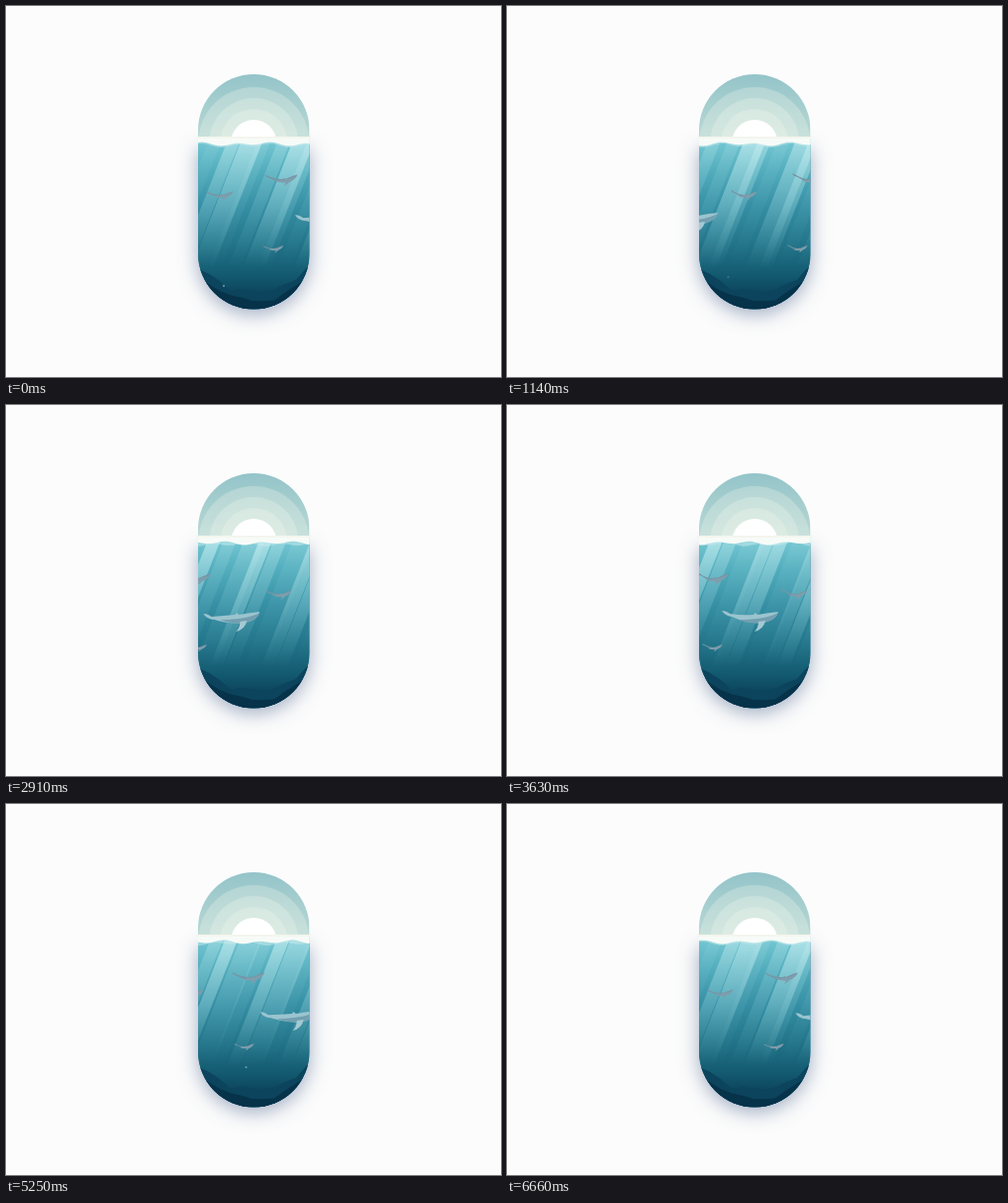
These frames come from a looping animation (500x375 px, 6.69 s). An HTML page with a canvas:

```html
<!DOCTYPE html>
<html lang="en">
<head>
<meta charset="utf-8">
<title>Whales</title>
<style>
  html, body { margin: 0; width: 100%; height: 100%; overflow: hidden; background: #fcfcfc; }
  canvas { display: block; }
</style>
</head>
<body>
<canvas id="stage" width="500" height="375"></canvas>
<script>
const c = document.getElementById('stage').getContext('2d');
const LOOP = 6690, STEP = 30, TAU = Math.PI * 2;
const LEFT = 194, RIGHT = 306.5, TOP = 69, BOTTOM = 306.5, SURFACE = 133;
const WIDTH = RIGHT - LEFT, RADIUS = WIDTH / 2, MID = LEFT + RADIUS;

// start x, y, distance swum per loop, size
const whales = [[270, 245, 137, .36], [216, 191, 136.5, .47], [278, 175, 155, .58], [321, 217, 164, 1]];

// Repeatable pseudo-random number in 0..1
const noise = n => Math.abs(Math.sin(n * 127.1 + 3) * 43758.5) % 1;

function gradient(y0, y1, ...colours) {
  const g = c.createLinearGradient(0, y0, 0, y1);
  colours.forEach((colour, i) => g.addColorStop(i / (colours.length - 1), colour));
  return g;
}

const sky = gradient(TOP, SURFACE, '#94c4c9', '#b8d8d4');
const water = gradient(SURFACE, BOTTOM, '#78cad5', '#51acbc', '#368fa4', '#24778c', '#135a70', '#06334b');
const beam = gradient(138, 265, '#d8f6f7', '#a5dfe6aa', '#7dc8d400');

function fill(path, colour) {
  c.fillStyle = colour;
  c.fill(path);
}

function disc(x, y, r, colour) {
  const path = new Path2D();
  path.arc(x, y, r, 0, TAU);
  fill(path, colour);
}

function capsule(top, corners) {
  const path = new Path2D();
  path.roundRect(LEFT, top, WIDTH, BOTTOM - top, corners);
  return path;
}

// Fills between a curve y(x) and a level edge
function area(edge, step, y, colour) {
  const path = new Path2D();
  path.moveTo(LEFT, edge);
  for (let x = LEFT; x < RIGHT + step; x += step) path.lineTo(x, y(x));
  path.lineTo(RIGHT + step, edge);
  fill(path, colour);
}

function drawShadow() {
  c.save();
  c.shadowColor = 'rgba(70, 95, 140, .5)';
  c.shadowBlur = 19;
  c.shadowOffsetY = 5;
  fill(capsule(140, [0, 0, RADIUS, RADIUS]), '#24778c');
  c.restore();
}

function drawSky() {
  c.fillStyle = sky;
  c.fillRect(LEFT, TOP, WIDTH, SURFACE - TOP);
  for (let r = 56; r > 23; r -= 11) disc(MID, 138, r, 'rgba(242, 247, 236, .27)');
  disc(MID, 138, 23, '#fff');
}

function drawRays(p) {
  for (let i = 0; i < 9; i++) {
    const turn = TAU * (p - .5 - .3 * i);
    const x = 204 + 17 * i + 2 * Math.sin(turn), w = i % 3 == 2 ? 22 : 13;
    c.globalAlpha = .32 + .24 * Math.cos(turn);
    fill(new Path2D(`M${x} 138h${w}l-50 127h${-w}z`), beam);
  }
  c.globalAlpha = 1;
}

function drawRocks() {
  [[293, 27, '#0b445c'], [301, 23, '#06324a']].forEach(([floor, lift, colour], layer) =>
    area(BOTTOM, 11, x => floor - lift * ((x - MID) / RADIUS) ** 2 - 6 * noise(Math.round(x) + layer), colour));
}

function drawSpecks(t) {
  for (let i = 0; i < 9; i++) {
    const age = (t - i * LOOP / 9) / 700;
    if (age < 0 || age >= 1) continue;
    c.globalAlpha = .5 * (1 - age);
    disc(205 + 75 * noise(i), 215 + 80 * noise(i + 20), 1.1, '#b9e2e8');
  }
  c.globalAlpha = 1;
}

function drawWhale([x, y, span, size], p) {
  const big = size == 1, m = big ? 0 : 5;
  const tail = -5 - m * .3 - 2 * Math.cos(TAU * (3 * p - 1.63));
  const back = big ? '#9bc4cf' : '#7795a5', belly = big ? '#739fb0' : '#7f9ead';
  c.save();
  c.translate(184 + (x - 184 + span * p) % span, y);
  c.scale(size, size);
  fill(new Path2D(`M-21 ${tail + 1}Q-8 ${m - 4} 3 ${m - 5}l2 -2 2 2Q18 ${m * .4 - 7} 28 -8
    Q26 0 14 ${3 + m * .4}Q-3 ${5 + m * .6} -21 ${tail + 3}z`), back);
  fill(new Path2D(`M-19 ${tail + 3}Q-23 ${tail - 2} -29 ${tail - 2}Q-26 ${tail + 3} -19 ${tail + 4}z`), back);
  fill(new Path2D(`M28 -7Q15 ${m * .4} -12 ${m * .5}Q0 ${5 + m * .6} 14 ${3 + m * .4}Q25 0 28 -7z`), belly);
  fill(new Path2D(`M8 ${2 + m * .4}Q8 8 4 12Q13 10 15 1z`), big ? '#a4c9d3' : belly);
  c.restore();
}

function drawFoam(p) {
  const turn = TAU * 3 * p;
  const wave = (base, dir) => x =>
    base + 1.3 * Math.sin(x / 5.5 + dir * turn) + .8 * Math.sin(x / 11 - dir * turn);
  area(SURFACE, 1, wave(141, -1), '#c9ecee80');
  area(SURFACE, 1, wave(139.5, 1), '#f7fbf8');
}

const begin = performance.now();

function frame() {
  const t = Math.floor((performance.now() - begin) % LOOP / STEP) * STEP, p = t / LOOP;
  c.fillStyle = '#fcfcfc';
  c.fillRect(0, 0, 500, 375);
  drawShadow();

  c.save();
  c.clip(capsule(TOP, RADIUS));
  drawSky();
  c.fillStyle = water;
  c.fillRect(LEFT, SURFACE, WIDTH, BOTTOM - SURFACE);
  drawRays(p);
  drawRocks();
  drawSpecks(t);
  whales.forEach(whale => drawWhale(whale, p));
  drawFoam(p);
  c.restore();

  c.fillStyle = '#f4f6ee';
  c.fillRect(192, 132, 116, 2);
  requestAnimationFrame(frame);
}
frame();
</script>
</body>
</html>
```
